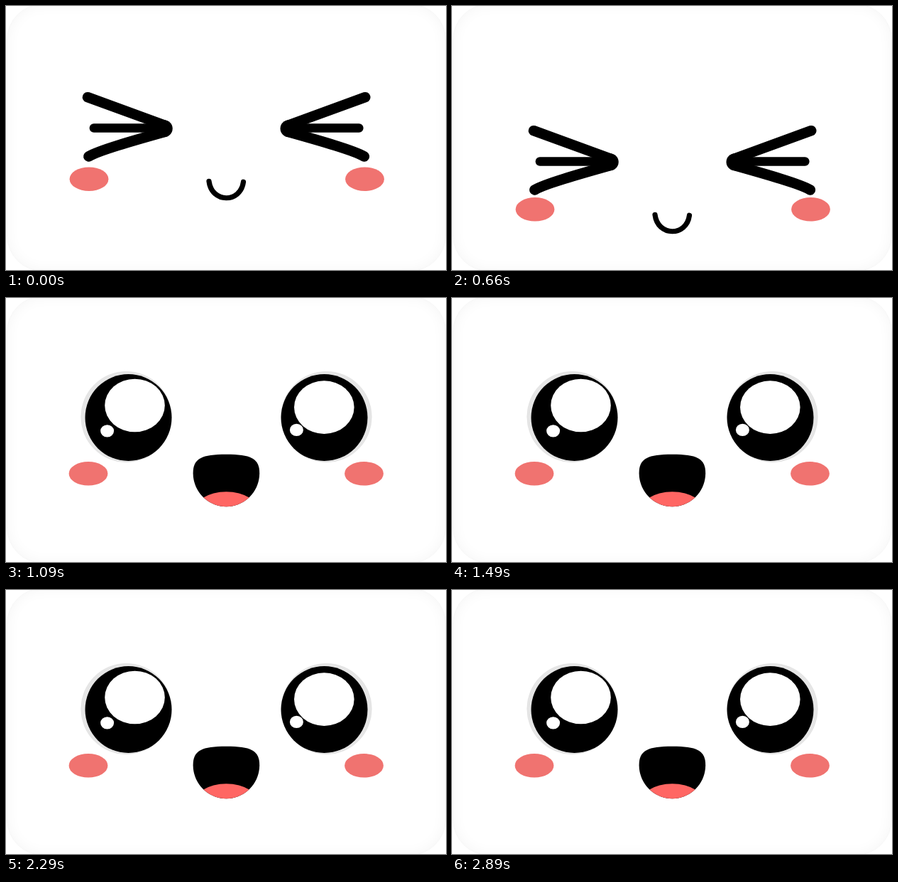
Recreate the animation shown at these times as an HTML page. Size 620 by 371 pixels, loop 2.99 s.

```html
<!DOCTYPE html>
<html lang="en">
<head>
<meta charset="utf-8">
<title>Happy face</title>
<style>
  html, body { margin: 0; width: 100%; height: 100%; overflow: hidden; background: #fff; }
  .stage { position: relative; width: 620px; height: 371px; overflow: hidden; }
  .card {
    position: absolute; left: 1px; top: -3px; width: 619px; height: 376px;
    box-sizing: border-box; border-radius: 51px;
    border: 1px solid #f6f6f6; background: #fff;
    box-shadow: inset 0 0 20px rgba(0, 0, 0, .045);
  }
  svg { position: absolute; left: 0; top: 0; }
  .line { fill: none; stroke: #000; stroke-linecap: round; stroke-linejoin: round; }
</style>
</head>
<body>
<div class="stage">
  <div class="card"></div>
  <svg width="620" height="371" viewBox="0 0 620 371">
    <defs>
      <g id="squint">
        <path class="line" stroke-width="14.6" d="M115 128.2L224.5 168"/>
        <path class="line" stroke-width="12.4" d="M123.8 171.5H222"/>
        <path class="line" stroke-width="14.6" d="M116.4 211.5C130 203 180 189 224.5 176.500"/>
        <circle cx="222.700" cy="172.200" r="12"/>
      </g>
      <path id="lips" d="M0 0C34.500 0 46.800 5.500 46.800 26.500C46.800 52.500 25.500 73.500 0 73.500S-46.800 52.500 -46.800 26.500C-46.800 5.500 -34.500 0 0 0Z"/>
      <clipPath id="inside"><use href="#lips"/></clipPath>
      <g id="mouth">
        <use href="#lips"/>
        <ellipse cy="82.500" rx="47" ry="30" fill="#ff6663" clip-path="url(#inside)"/>
      </g>
    </defs>
    <g id="face"></g>
  </svg>
</div>
<script>
const face = document.getElementById('face');
const mix = (a, b, k) => a + (b - a) * k;

const oval = (x, y, rx, ry, fill) =>
  `<ellipse cx="${x}" cy="${y}" rx="${rx}" ry="${ry}" fill="${fill}"/>`;

const cheeks = (x, y) =>
  [x, x + 388.5].map(cx => oval(cx, y, 27.4, 16.8, '#f07370')).join('');

// drop: 0 raised, 1 lowered
const squint = drop => `<g transform="translate(0 ${47 * drop})">
    <use href="#squint"/>
    <use href="#squint" transform="translate(621.2 0) scale(-1 1)"/>
    <path class="line" stroke-width="7.2" d="M286 246.3C289.8 277.4 330.5 277.4 334.5 247.2"/>
  </g>` + cheeks(117, mix(243.2, 285.8, drop));

// Shines grow from their lower left corner; tilt moves the two closer together.
const shines = (x, y, size, tilt) =>
  `<g transform="translate(${x} ${y}) scale(${size})">` +
  oval(42.3, 2.6 * tilt - 37.3, 42.3, 37.3, '#fff') +
  oval(3.4, -1.4 * tilt - 1.5, 9.5, 8.6, '#fff') + '</g>';

const eye = (x, y, side) =>
  oval(x + 3 * side, y - 1, 63.7, 63.7, '#e6e6e6" stroke="#dcdcdc" stroke-width=".6') +
  oval(x, y, 61, 61, '#000');

// joy: 0 calm, 1 excited
function open(joy) {
  const sink = .8 * (1 - joy);
  const size = mix(.903, 1, joy);
  return eye(172.5, 168 + sink, -1) + shines(139.2, 188.3 + sink, size, 0) +
    eye(448.5, 168 + sink, 1) + shines(mix(403.9, 406, joy), 188.3 + sink, size, joy) +
    cheeks(116, mix(251.6, 246.8, joy)) +
    `<use href="#mouth" transform="translate(310.4 ${mix(230, 219.7, joy)}) scale(${mix(.843, 1, joy)})"/>`;
}

const LOOP = 2990;
const HOLD = 500, BOUNCE = 80, BOUNCES = 5, PULSE = 100;
const WAKE = HOLD + BOUNCE * BOUNCES;
const CALM = 990;

// Both halves flip between two extremes at a steady beat.
function drawAt(t) {
  if (t < HOLD) return squint(0);
  if (t < WAKE) return squint(1 - Math.floor((t - HOLD) / BOUNCE) % 2);
  return open(Math.abs(Math.floor((t - CALM) / PULSE) % 2));
}

let shown;
const start = performance.now();
function draw(now) {
  const picture = drawAt(Math.max(0, now - start) % LOOP);
  if (picture !== shown) face.innerHTML = shown = picture;
  requestAnimationFrame(draw);
}
draw(start);
</script>
</body>
</html>
```
